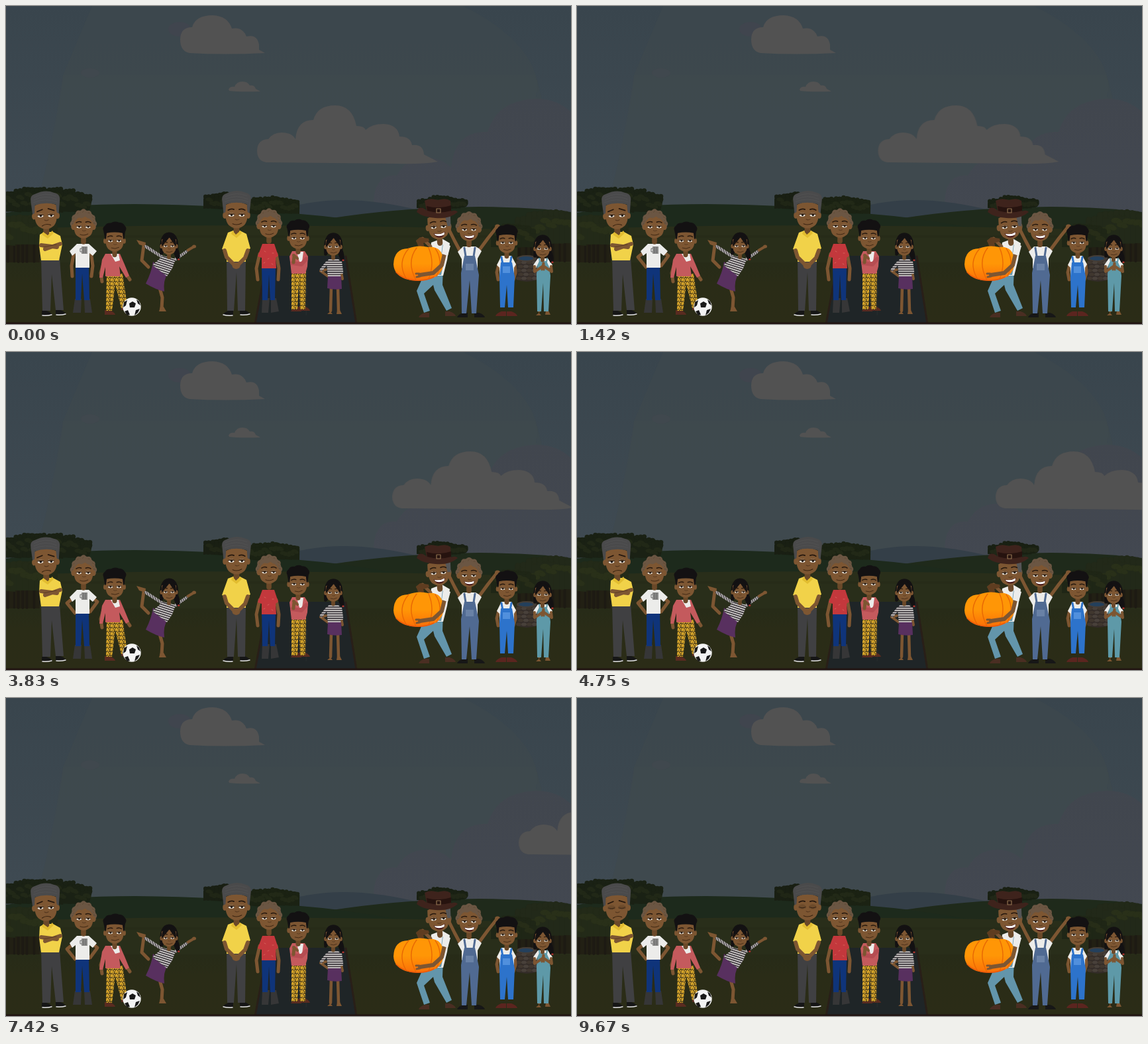
These frames come from a looping animation (853 px wide and 480 px high, 9.76 s). An HTML page:

```html
<!DOCTYPE html>
<html lang="en">
<head>
<meta charset="utf-8">
<title>Families in the field</title>
<style>
  html, body { margin: 0; width: 100%; height: 100%; overflow: hidden; background: #2a2c17; }
  svg { display: block; width: 100vw; height: 100vh; }
  .drift { animation: drift 9.76s steps(117) -20ms infinite; }
  .lid { opacity: 0; animation: blink 9.76s step-end infinite; }
  .armL { animation: armL 9.76s infinite; }
  .armR { animation: armR 9.76s infinite; }
  @keyframes drift { to { transform: translateX(519.5px); } }
  @keyframes blink { 0% { opacity: 0; } 98.2%, 100% { opacity: 1; } }
  @keyframes armL {
    0%, .8% { d: path("M103 370L99 392L100 408"); }
    5%, 100% { d: path("M103 370L92 379L104 394"); }
  }
  @keyframes armR {
    0%, .8% { d: path("M128 370L131 392L129 408"); }
    5%, 100% { d: path("M129 370L138 377L127 392"); }
  }
</style>
</head>
<body>
<svg viewBox="0 0 853 480" preserveAspectRatio="none">
  <defs>
    <linearGradient id="sky" x2="0" y2="1">
      <stop offset="0" stop-color="#39454d"/><stop offset="1" stop-color="#404b53"/>
    </linearGradient>
    <linearGradient id="haze" x2="0" y2="1">
      <stop offset="0" stop-color="#41464e"/><stop offset="1" stop-color="#434851"/>
    </linearGradient>
    <linearGradient id="field" x2="0" y2="1">
      <stop offset="0" stop-color="#272b18"/><stop offset=".35" stop-color="#2a2c17"/><stop offset="1" stop-color="#2b2c17"/>
    </linearGradient>
    <linearGradient id="pumpkin" x2="0" y2="1">
      <stop offset=".5" stop-color="#ff9606"/><stop offset="1" stop-color="#fb6f08"/>
    </linearGradient>
    <pattern id="stripe" width="4" height="3.4" patternUnits="userSpaceOnUse">
      <rect width="4" height="3.4" fill="#cfccca"/><rect width="4" height="1.7" fill="#3e393e"/>
    </pattern>
    <pattern id="slant" width="4" height="3.4" patternUnits="userSpaceOnUse" patternTransform="rotate(18)">
      <rect width="4" height="3.4" fill="#cfccca"/><rect width="4" height="1.7" fill="#3e393e"/>
    </pattern>
    <pattern id="sleeve" width="3" height="4" patternUnits="userSpaceOnUse" patternTransform="rotate(-20)">
      <rect width="3" height="4" fill="#cfccca"/><rect width="1.5" height="4" fill="#3e393e"/>
    </pattern>
    <pattern id="zigzag" width="7" height="6" patternUnits="userSpaceOnUse">
      <rect width="7" height="6" fill="#d4a32a"/>
      <path d="M0 4L3 1L4 3L7 1M1 6L4 5" fill="none" stroke="#41351a" stroke-width="1.1"/>
    </pattern>
  </defs>
  <g id="scene"></g>
</svg>
<script>
const SKIN = '#7d5632', DARK = '#553820', GREY = '#404042', BLACK = '#131112', WHITE = '#ececea';
const JEANS = '#0f347a', YELLOW = '#f1d249', PINK = '#c45a5d', PURPLE = '#58305f', CLOUD = '#525252';
const MANHAIR = '#4a4a4b', CURLS = '#6b5643', DENIM = '#6395ab';

const shape = (d, fill, more = '') => `<path d="${d}" fill="${fill}" ${more}/>`;
const line = (d, color, w = 1, more = '') =>
  `<path d="${d}" fill="none" stroke="${color}" stroke-width="${w}" stroke-linejoin="round" stroke-linecap="round" ${more}/>`;
const oval = (x, y, rx, ry, fill) => `<ellipse cx="${x}" cy="${y}" rx="${rx}" ry="${ry}" fill="${fill}"/>`;
const limb = (d, w = 6, color = SKIN, more = '') => line(d, color, w, more);

let seed = 7;
const rand = () => (seed = seed * 16807 % 2147483647) / 2147483647;

// Overlapping crowns with an uneven edge and a few lighter leaf clumps.
function bush(x0, x1, top, base, fill, light, size = 8) {
  let crowns = '', leaves = '';
  for (let x = x0 + size; x < x1 - size / 2; x += size * .7) {
    const t = (x - x0) / (x1 - x0), y = top + size * .7 + (1 - Math.sin(Math.PI * t)) * (base - top) * .3 + rand() * 4;
    crowns += oval(x, y, size, size * .8, fill);
    for (let i = -1; i <= 1; i++) crowns += oval(x + i * size * .6, y - size * .55 + rand() * 3, size * .4, size * .4, fill);
    crowns += shape(`M${x - size} ${y}H${x + size}L${Math.min(x + size, x1)} ${base - 3 + rand() * 5}L${Math.max(x - size, x0)} ${base}Z`, fill);
    const ly = y + rand() * (base - y) * .6;
    leaves += oval(x, ly, size * .6, size * .35, light) + oval(x + size * .4, ly + 2, size * .4, size * .3, light);
  }
  return crowns + leaves;
}

function trunks(x0, x1, y0, y1) {
  let out = shape(`M${x0 - 3} ${y0}H${x1 + 3}V${y1}H${x0 - 3}Z`, '#222014');
  for (let x = x0; x < x1; x += 6 + rand() * 5) out += line(`M${x} ${y0 + rand() * 6}V${y1 - 1}`, '#1d1a13', 2 + rand() * 2);
  return out;
}

const ring = [...Array(15)].map((_, i) => {
  const a = Math.PI * (.95 + i / 12.7), r = i % 2 ? 1 : .92;
  const x = Math.cos(a) * 18.5 * r, y = Math.sin(a) * 23 * r - 3;
  return oval(x, y, 5.4, 5.4, CURLS) + line(`M${x - 2} ${y + 1}Q${x} ${y - 4} ${x + 3} ${y}`, '#57452f', .8);
}).join('');

const hair = {
  man: ['', shape('M-20 -2L-22 -21Q-24 -31 -15 -33Q0 -40 14 -34Q24 -32 22 -21L20 -2L17 -4L16 -16Q0 -21 -16 -16L-17 -4Z', MANHAIR) +
    line('M-17 -24Q0 -32 17 -24M-17 -28Q0 -36 16 -29M-18 -20Q0 -27 18 -20', '#565657', .6)],
  curls: [ring, shape('M-17 -5Q-18 -25 0 -25Q18 -25 17 -5Q13 -15 7 -15L3 -18L-3 -15L-8 -16Q-14 -14 -17 -5Z', CURLS)],
  crop: ['', shape('M-18 -2L-21 -18Q-24 -24 -18 -28Q-15 -34 -7 -33Q0 -38 8 -34Q16 -34 19 -28Q24 -23 20 -17L18 -2L16 -4L15 -14Q0 -17 -15 -14L-16 -4Z', BLACK)],
  braids: [shape('M-21 20Q-25 -31 0 -32Q24 -31 22 8Q27 20 25 31L18 33L10 15L-12 15Q-15 24 -21 20Z', BLACK),
    shape('M-17 2Q-18 -25 1 -26Q18 -25 17 2Q11 -5 1 -20Q-10 -6 -17 2Z', BLACK) + oval(23, 32, 2.5, 2, '#b8342f')],
  side: ['', shape('M12 -18H21L20 4L16 8L14 -4Z', '#555556')]
};

const mouths = {
  smile: line('M-6 14Q1 17 8 13', '#3a2412', 1.1),
  sad: line('M-6 16Q0 12 7 15', '#3a2412', 1.2),
  grin: shape('M-9 10Q1 14 10 9Q8 18 1 18Q-6 18 -9 10Z', '#48191a') + shape('M-8 11Q1 14 9 10L8 14Q1 17 -6 14Z', '#fff')
};

function head(x, y, s, style, mood = 'smile', blink = false, turn = 0) {
  const eye = ex => oval(ex, 0, 4.5, 2.9, '#e6e0d6') + oval(ex + .4, .1, 1.8, 2.1, '#1d1410') +
    shape(`M${ex - 4.8} -.6A5 3.2 0 0 1 ${ex + 4.8} -.6Z`, '#674729') + line(`M${ex - 4.8} -.6H${ex + 4.8}`, '#24160d', .9);
  const lid = ex => oval(ex, 0, 5.2, 3.7, '#6d4b2b') + line(`M${ex - 5} 1Q${ex} 3 ${ex + 5} 1`, '#24160d', .9);
  const brow = mood === 'sad' ? 'M-13 -6L-5 -9M4 -10L13 -7' : 'M-13 -7Q-8 -10 -4 -8M4 -8Q9 -10 13 -7';
  const [back, front] = hair[style];
  return `<g transform="translate(${x} ${y}) scale(${s}) rotate(${turn})">${back}` +
    limb('M0 15V27', 9, '#6b4929') + oval(-18, 1, 3.2, 5, SKIN) + oval(18, 1, 3.2, 5, SKIN) +
    shape('M-17 -15Q0 -24 17 -15Q19 9 12 16Q6 21 0 21Q-6 21 -12 16Q-19 9 -17 -15Z', SKIN) + front +
    eye(-8) + eye(8) + (blink ? `<g class="lid">${lid(-8)}${lid(8)}</g>` : '') +
    line(brow, '#25180f', 1.8) + line('M-2 7Q0 9 4 7', DARK, 1.1) + mouths[mood] + '</g>';
}

const shoe = (x, y, dir, fill, sole = '') =>
  shape(`M${x - 4 * dir} ${y - 7}H${x + 3 * dir}Q${x + 11 * dir} ${y - 4} ${x + 12 * dir} ${y}H${x - 4 * dir}Z`, fill) +
  (sole && line(`M${x - 3 * dir} ${y}Q${x + 4 * dir} ${y + 1} ${x + 11 * dir} ${y - 1}`, sole, 1.5));

const foot = (x, y, dir, fill = SKIN) => shape(`M${x - 2} ${y - 6}H${x + 2}L${x + 5 * dir} ${y}H${x - 3 * dir}Z`, fill);

function landscape() {
  return shape('M0 0H853V345H0Z', 'url(#sky)') +
    shape('M130 0H690Q780 45 800 104L853 320H40Q78 190 86 104Z', '#3e494e', 'opacity=".55"') +
    shape('M86 104H798Q806 120 800 135L853 320H42Q70 210 86 104Z', '#414a4f', 'opacity=".5"') +
    oval(262, 35, 17, 11, '#40454e') + oval(127, 101, 14, 7, '#40484e') +
    shape('M555 310Q552 252 590 256Q605 228 636 229Q658 230 672 244Q678 188 727 190Q742 142 800 140Q832 140 853 160V330H555Z', 'url(#haze)') +
    shape('M263 51Q263 32 281 32Q286 14 312 14Q335 15 341 34Q357 31 363 46Q379 42 382 58V66L391 71Q330 74 277 71Q263 68 263 51Z', CLOUD) +
    shape('M336 126Q338 121 345 122Q348 114 357 114Q365 114 368 120Q375 119 377 125L384 129Q350 130 337 128Z', CLOUD) +
    shape('M379 218Q380 201 396 201Q403 191 416 191Q432 191 437 201Q439 172 464 172Q470 150 497 150Q523 150 529 181Q541 181 543 187Q552 178 570 178Q592 179 594 197Q611 197 613 210Q630 208 631 224L652 235Q630 239 590 238L393 236Q379 234 379 218Z', CLOUD, 'class="drift"') +
    shape('M410 310Q500 276 630 310V335H410Z', '#343f48') +
    shape('M480 322Q590 304 715 303Q800 304 853 311V360H480Z', '#1f2a1b') +
    shape('M0 312Q90 299 195 299Q330 300 445 314Q520 320 610 337L440 360H0Z', '#1d2a1c') +
    shape('M0 337Q330 324 853 340V480H0Z', '#292e1a') +
    line('M0 348H853', '#272b18', 3) +
    shape('M0 387H853V480H0Z', 'url(#field)') +
    bush(-20, 126, 273, 310, '#1a2114', '#212817', 9) + trunks(3, 48, 352, 387) +
    bush(-30, 72, 315, 360, '#232a18', '#293019', 13) +
    bush(298, 370, 281, 306, '#191f13', '#202616', 8) + bush(360, 443, 286, 313, '#1b2213', '#222917', 8) +
    bush(620, 694, 286, 305, '#192013', '#212717', 8) +
    trunks(775, 850, 350, 386) +
    bush(768, 875, 307, 358, '#222919', '#293019', 12) + bush(732, 800, 328, 364, '#1f2616', '#272d18', 11) +
    shape('M395 377H513L529 480H376Z', '#1f2527') +
    line('M395 378L376 480M513 378L529 480', '#291f18', 3, 'stroke-dasharray="9 2"') +
    line('M455 390L453 476', '#242a2b', 2, 'stroke-dasharray="16 14"') +
    shape('M0 477.5H853V480H0Z', '#211412');
}

function well() {
  let out = shape('M771 381H802V413Q786 419 771 413Z', '#332c28');
  for (let r = 0; r < 5; r++) for (let c = 0; c < 4; c++)
    out += oval(774 + c * 8 + (r % 2) * 3, 387 + r * 6, 4, 2.6, c % 2 ? '#48403a' : '#40372f');
  return out + oval(786, 381, 15, 5, '#443d37') + oval(785, 381, 11, 3, '#24405c');
}

const gentShoes = (x1, dir, x2, y) => shoe(x1, y, dir, '#161616', '#e5e5e5') + shoe(x2, y - 1, 1, '#161616', '#e5e5e5');

const crossedMan = () =>
  gentShoes(58, 1, 79, 467) +
  shape('M53 381H81L87 459H75L69 405L67 460H55Z', GREY) +
  shape('M51 345L58 341H71L82 347L85 360L80 384H53L50 362Z', YELLOW) +
  head(60, 316, .99, 'man', 'sad', true, -2) +
  shape('M56 341L63 346L70 339L72 343L63 351L54 345Z', '#e2bd30') +
  limb('M53 361L77 364M59 367L82 359', 6) + line('M56 364L76 360', DARK, .8);

const mugWoman = () =>
  shape('M104 442H114L113 463H101ZM118 442H127L130 463H119Z', '#363637') +
  shape('M105 392H125L126 444H118L115 404L113 444H105Z', JEANS) +
  limb('M103 370L99 392L100 408', 5, SKIN, 'class="armL"') +
  limb('M128 370L131 392L129 408', 5, SKIN, 'class="armR"') +
  shape('M107 359H125L137 370L131 377L126 373V395H105V373L100 377L96 370Z', WHITE) +
  head(117, 333, .85, 'curls') +
  shape('M114 363H123V374H114Z', '#8b8b89') + line('M114 366H112V371H114M117 364V373M120 364V373', '#626262', 1);

const ballBoy = () =>
  shoe(153, 466, 1, '#592b20') + shoe(178, 459, 1, '#592b20') +
  shape('M152 404H176L183 452L174 456L165 420L160 460H151Z', 'url(#zigzag)') +
  limb('M147 389L143 403L145 416M171 386L181 404L187 413', 5) +
  shape('M150 374H172L179 390L186 407L181 410L171 393L173 408H150V394L146 410H141L145 383Z', PINK) +
  shape('M158 374H170L172 384L165 386Z', WHITE) +
  head(164, 354, .8, 'crop') +
  `<circle cx="190" cy="454" r="13.7" fill="#f3f3f3"/>` +
  shape('M186 449L191 446L196 449L194 455H187ZM178 447L183 444L181 452L177 455ZM197 443L201 446L203 452L199 449ZM179 461L184 459L187 466L183 467ZM196 459L202 457L199 463L194 467Z', '#191919');

const dancer = () =>
  limb('M215 394L205 384L208 361', 5) + shape('M197 353L211 357L210 363L201 360Z', SKIN) +
  limb('M231 422L236 440L235 457', 5) + shape('M233 454H238L242 461H231Z', SKIN) +
  shape('M222 386L244 404Q237 414 239 431Q226 428 211 419Q220 401 222 386Z', PURPLE) +
  limb('M274 369L284 363', 4) + oval(284, 363, 3, 2.5, SKIN) +
  limb('M239 381L211 363M252 385L272 371', 4.5, 'url(#sleeve)') +
  shape('M237 377L256 382L251 396L243 408L221 391Z', 'url(#slant)') +
  head(246, 362, .64, 'braids');

const calmMan = () =>
  gentShoes(339, -1, 357, 467) +
  shape('M333 382H362L361 460H350L348 402L344 460H334Z', GREY) +
  shape('M335 342L343 339H353L363 344L369 366L362 370L362 386H333V370L326 367Z', YELLOW) +
  limb('M330 369L333 379L345 391M365 369L361 380L350 391', 6) + oval(347.5, 392, 6, 5, SKIN) +
  head(348, 315, .98, 'man', 'smile', true) +
  shape('M342 339L347 345L354 339L356 343L348 350L340 344Z', '#e2bd30');

const redWoman = () =>
  shape('M387 441H398L396 463H386ZM400 441H408L412 461L400 463Z', '#363637') +
  shape('M386 392H407L406 444H399L397 405L395 444H387Z', JEANS) +
  limb('M383 374L378 396L380 413M408 374L412 396L411 413', 5) +
  shape('M387 359H405L411 377L407 380L408 396H386V380L380 378Z', '#c3383c') +
  head(397, 332, .85, 'curls') + line('M390 370L392 371M402 373H404M395 382L397 381M401 389L403 390M389 388L391 387', '#d6605a', 1);

const thinker = () =>
  shoe(442, 461, -1, '#592b20') + shoe(447, 460, 1, '#592b20') +
  shape('M431 400H453L452 458H444L442 416L440 458H431Z', 'url(#zigzag)') +
  shape('M432 370H451L456 378L455 393L452 404H431L428 378Z', PINK) +
  shape('M439 371H449L447 386L443 386Z', WHITE) +
  limb('M453 382L446 390L432 388', 6, '#b54d52') + limb('M434 387L435 377', 5) + limb('M434 376L440 381', 4) +
  head(441, 350, .79, 'crop');

const stripeGirl = () =>
  limb('M491 424L490 460M501 424L502 460', 4.5) + foot(490, 465, -1) + foot(502, 465, 1) +
  limb('M483 398L475 400L486 408M506 402L508 412', 4) +
  limb('M485 387L476 398M505 387L507 402', 4.5, 'url(#stripe)') +
  shape('M487 382H502L507 389L505 410H486L484 389Z', 'url(#stripe)') +
  shape('M486 408H506L507 427Q496 429 485 426Z', PURPLE) +
  head(494, 363, .65, 'braids');

const farmer = () =>
  shoe(635, 470, -1, '#4a2e22') + shoe(667, 468, 1, '#4a2e22') +
  shape('M637 392H660L659 421L673 456L665 460L647 429L645 421L631 434L640 460L631 463L620 430Z', DENIM) +
  shape('M642 357L658 351L670 358L666 383L660 407H638Z', WHITE) +
  limb('M641 363L629 351L622 355', 5) +
  shape('M659 360L665 362L657 406H641L644 385L656 384Z', DENIM) +
  head(653, 333, .92, 'side', 'grin', false, -5) +
  shape('M622 306Q628 302 635 309L632 294Q640 289 652 293Q664 289 671 294L672 310Q679 307 682 311Q670 322 648 320Q630 319 620 311Z', '#3e231c') +
  shape('M635 302Q655 307 672 301V309Q654 314 636 309Z', '#26130f') + line('M650 306H656V312H650Z', '#8f7250', 1.2) +
  shape('M624 367L619 354L625 349L638 351L639 355L630 358L633 367Z', '#5f3d20') +
  shape('M585 390Q586 366 607 366Q622 360 638 364Q659 362 661 386Q660 406 641 412Q621 418 603 412Q586 406 585 390Z', 'url(#pumpkin)') +
  line('M608 366Q590 387 604 411M620 365Q604 386 619 414M638 365Q648 388 638 412M648 366Q661 384 650 408', '#e86804', 1.4) +
  line('M589 402Q600 413 619 414Q634 415 646 409', '#ee5a0a', 1.4) +
  limb('M664 366L658 391L645 403L625 406', 6) + line('M624 404H619M625 408L620 409', SKIN, 3) + shape('M660 358L671 362L667 377L658 374Z', WHITE);

const cheer = () =>
  shoe(693, 470, -1, '#171717') + shoe(711, 470, 1, '#171717') +
  limb('M685 369L677 354L669 338M714 369L728 350L740 335', 5) + oval(669, 336, 3, 4, SKIN) + oval(742, 333, 4, 3.5, SKIN) +
  shape('M690 363H709L714 366L718 370L712 381V396H688V382L682 371Z', WHITE) +
  shape('M692 377H708L714 406L710 464H703L700 414L695 464H688L687 403Z', '#506a92') +
  line('M692 365L694 378M708 365L706 378', '#506a92', 3) + shape('M694 389H706V399H694Z', '#6981a5') +
  head(699, 337, .86, 'curls', 'grin');

const blueBoy = () =>
  shoe(751, 468, -1, '#5b251f') + shoe(760, 468, 1, '#5b251f') +
  limb('M744 390L741 402L743 413M768 390L769 403L766 413', 5) +
  shape('M748 377H763L770 390L767 395V409H745V395L741 391Z', WHITE) +
  shape('M747 387H764L768 409L766 455H758L756 421L753 455H746L745 408Z', '#2d73cb') +
  line('M748 379L750 390M763 379L761 390', '#2d73cb', 3) + shape('M750 393H761V403H750Z', '#5190dd') +
  head(756, 357, .77, 'crop');

const prayGirl = () =>
  foot(805, 467, -1) + foot(817, 466, 1) +
  shape('M803 381H818L822 407L819 461H812L811 418L808 461H802L801 405Z', '#5e99a8') +
  shape('M803 381H818L825 391L821 396L816 385H805L800 396L796 391Z', WHITE) +
  line('M805 381L807 392M817 381L815 392', '#5e99a8', 2) +
  limb('M798 393L798 401L810 393M823 393L824 401L812 393', 4) + limb('M809 398L811 388M812 398L812 388', 3) +
  head(810, 366, .65, 'braids');

const cast = [crossedMan, mugWoman, ballBoy, dancer, calmMan, redWoman, thinker, stripeGirl, farmer, cheer, blueBoy, prayGirl];
document.getElementById('scene').innerHTML = landscape() + well() + cast.map(draw => draw()).join('');
</script>
</body>
</html>
```
